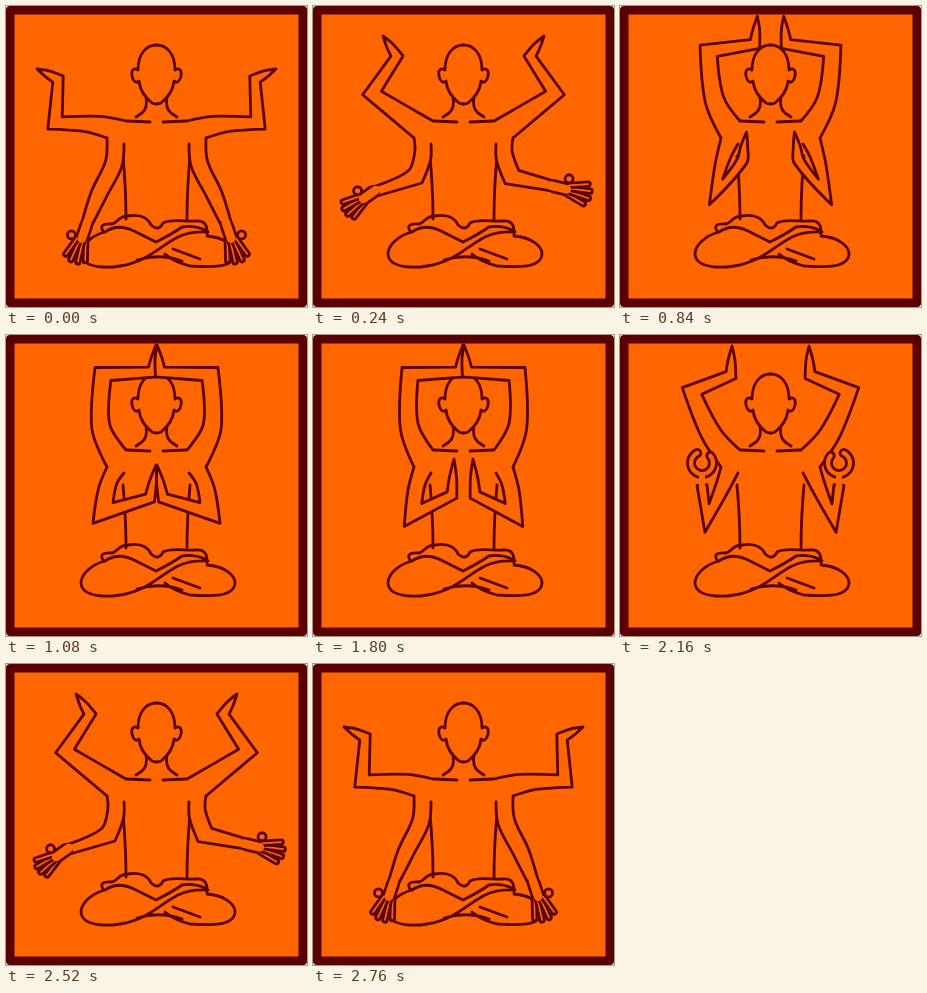
Recreate the animation shown at these times as an HTML page with a canvas. Size 301 by 301 pixels, loop 2880 ms.

```html
<!DOCTYPE html>
<html lang="en">
<head>
<meta charset="utf-8">
<title>Four-armed meditation</title>
<style>
html, body { margin: 0; width: 100%; height: 100%; overflow: hidden; background: #fff; }
canvas { display: block; }
</style>
</head>
<body>
<canvas id="stage" width="301" height="301"></canvas>
<script>
const ctx = document.getElementById('stage').getContext('2d');
const ORANGE = '#ff6600', MAROON = '#5a0000', LINE = 2.8;
const STEP = 120, STEPS = 24, LAST_POSE = 9;

const halfBody = new Path2D(`M117 150 C119 172 120 190 120 213
  M140 91 Q142 102 136 107 L130 111
  M150.5 39 C140 39 132 48 132 64 C127 61 125 65 126 70 C127 75 130 78 133 75
  C134 86 141 93 146 97 Q148 98 150.5 98`);
const collar = new Path2D('M121 115 L144 116');
const legs = new Path2D(`M99 226 C84 230 75 240 75 248 C76 263 103 262 114 260
  C143 255 154 240 172 231 Q184 225 202 226
  M201 230 C218 231 229 240 229 248 C228 263 202 261 184 260 Q168 256 159 248
  M131 254 Q154 247 176 255
  M97 225 Q92 217 106 218 C112 217 112 210 122 210 C134 208 142 212 145 219 Q153 226 157 217
  C165 212 180 216 190 215 Q202 214 201 228
  M99 226 Q112 217 128 225 L150 236 M167 243 L194 253
  M150 236 Q166 228 176 221 Q188 219 199 224`);

// Elbow, wrist and fingertip of a left arm at its key poses.
const upperArm = {
  start: [101, 132], end: [120, 115], elbow: 6.8,
  shift: pose => 1.5 * pose - 3,
  keys: {
    0: [[49, 117], [52, 73], [31, 63]],
    2: [[59, 87], [84, 50], [70, 30]],
    5: [[72, 56], [111, 40], [112, 11]],
    8: [[97, 39], [147, 37], [150, 10]]
  }
};
const lowerArm = lift => ({
  start: [118, 138], end: [101, 132], elbow: 8, hasFingers: true,
  shift: pose => 5 - 0.9 * pose,
  keys: {
    0: [[93, 188], [80, 220], [68, 256]],
    2: [[102, 171], [60, 186 - lift / 3], [32 - lift / 2, 206 - lift]],
    4: [[90, 180], [50, 155], [27, 138]],
    5: [[87, 183], [82, 150], [82, 128]],
    6: [[92, 192], [105, 150], [112, 128]],
    8: [[100, 180], [139, 160], [141, 124]],
    9: [[97, 178], [144, 163], [150, 130]]
  }
});
// The right hand is held a little higher on its way out.
const sides = [{ lower: lowerArm(0) }, { lower: lowerArm(17), mirrored: true }];

const mix = (a, b, f) => [a[0] + (b[0] - a[0]) * f, a[1] + (b[1] - a[1]) * f];
const add = (p, d, k) => [p[0] + d[0] * k, p[1] + d[1] * k];
const polar = (p, angle, r) => add(p, [Math.cos(angle), Math.sin(angle)], r);
const perp = d => [d[1], -d[0]];
const unit = (a, b) => {
  const x = b[0] - a[0], y = b[1] - a[1], d = Math.hypot(x, y) || 1;
  return [x / d, y / d];
};

function jointsAt(keys, pose) {
  const poses = Object.keys(keys).map(Number);
  const from = poses.filter(k => k <= pose).pop();
  const to = poses.find(k => k > pose);
  if (to === undefined) return keys[from];
  return keys[from].map((p, i) => mix(p, keys[to][i], (pose - from) / (to - from)));
}

// Both outline points beside joint q, mitred where the limb bends.
function corners(p, q, r, half) {
  const n = add(perp(unit(p, q)), perp(unit(q, r)), 1);
  const m = Math.hypot(...n) || 0.01, k = half * Math.min(2 / m, 1.8) / m;
  return [add(q, n, k), add(q, n, -k)];
}

// Smooth line through the points; sharp turns stay corners.
function curve(pts) {
  const tangents = pts.map((p, i) => {
    if (!i || i === pts.length - 1) return [0, 0];
    const a = unit(pts[i - 1], p), b = unit(p, pts[i + 1]);
    return a[0] * b[0] + a[1] * b[1] < 0.6 ? [0, 0] : unit(pts[i - 1], pts[i + 1]);
  });
  ctx.beginPath();
  ctx.moveTo(...pts[0]);
  for (let i = 1; i < pts.length; i++) {
    const p = pts[i - 1], q = pts[i], h = Math.hypot(q[0] - p[0], q[1] - p[1]) / 3;
    ctx.bezierCurveTo(...add(p, tangents[i - 1], h), ...add(q, tangents[i], -h), ...q);
  }
  ctx.fill();
  ctx.stroke();
}

function strokeWith(color, width) {
  ctx.strokeStyle = color;
  ctx.lineWidth = width;
  ctx.stroke();
  ctx.strokeStyle = MAROON;
  ctx.lineWidth = LINE;
}

function segment(a, b) {
  ctx.beginPath();
  ctx.moveTo(...a);
  ctx.lineTo(...b);
}

function outlined(width) {
  strokeWith(MAROON, width + LINE);
  strokeWith(ORANGE, width - LINE);
}

function openHand(wrist, tip, angle) {
  const length = Math.hypot(tip[0] - wrist[0], tip[1] - wrist[1]);
  const palm = mix(wrist, tip, 0.35);
  segment(wrist, palm);
  strokeWith(MAROON, 14);
  for (let i = -1.5; i < 2; i++) {
    const spread = angle + i * 0.2;
    segment(polar(wrist, spread, length * 0.4), polar(wrist, spread, length * (1 - 0.06 * Math.abs(i))));
    outlined(4.5);
  }
  segment(mix(wrist, tip, -0.1), palm);
  strokeWith(ORANGE, 8.6);
  // Thumb and forefinger form a ring.
  ctx.beginPath();
  ctx.arc(...polar(wrist, angle + 0.7, length * 0.45), 4, 0, 7);
  ctx.fill();
  ctx.stroke();
}

function curledHand(wrist, tip, angle) {
  ctx.beginPath();
  ctx.arc(...tip, 11, angle + 0.85, angle + 5.85);
  outlined(7);
  segment(polar(wrist, angle, -2), polar(tip, angle, -12));
  strokeWith(ORANGE, 6);
}

function arm({ start, end, elbow, shift, keys, hasFingers }, pose) {
  const [e, w, tip] = jointsAt(keys, pose);
  const root = mix(start, end, 0.5);
  const muscle = perp(unit(root, e));
  const [e1, e2] = corners(root, e, w, elbow);
  const [w1, w2] = corners(e, w, tip, 5);
  const pointed = !hasFingers || pose > 6;
  const belly = add(mix(w, tip, 0.5), perp(unit(w, tip)), 3.5);
  const back = add(mix(w, tip, 0.5), perp(unit(w, tip)), -3.5);
  curve([
    start, add(mix(start, e1, 0.4), muscle, shift(pose)), e1, w1,
    ...(pointed ? [belly, tip, back] : []),
    w2, e2, add(mix(end, e2, 0.4), muscle, shift(pose)), end
  ]);
  if (pointed) return;
  const angle = Math.atan2(tip[1] - w[1], tip[0] - w[0]);
  (pose > 4 ? curledHand : openHand)(w, tip, angle);
}

function bothSides(paint) {
  for (const side of sides) {
    ctx.save();
    if (side.mirrored) ctx.transform(-1, 0, 0, 1, 301, 0);
    paint(side);
    ctx.restore();
  }
}

function draw(pose) {
  ctx.clearRect(0, 0, 301, 301);
  ctx.fillStyle = MAROON;
  ctx.beginPath();
  ctx.roundRect(0, 0, 301, 301, 4);
  ctx.fill();
  ctx.fillStyle = ORANGE;
  ctx.fillRect(8.5, 8.5, 284, 284);
  ctx.strokeStyle = MAROON;
  ctx.lineWidth = LINE;
  ctx.lineCap = ctx.lineJoin = 'round';

  bothSides(() => ctx.stroke(halfBody));
  ctx.stroke(legs);
  bothSides(() => {
    arm(upperArm, pose);
    ctx.stroke(collar);
  });
  bothSides(side => arm(side.lower, pose));
}

function tick() {
  const step = Math.floor(performance.now() / STEP) % STEPS;
  // Forward, a long rest in prayer, then back again.
  draw(Math.min(step, LAST_POSE, STEPS - 1 - step));
  requestAnimationFrame(tick);
}
tick();
</script>
</body>
</html>
```
